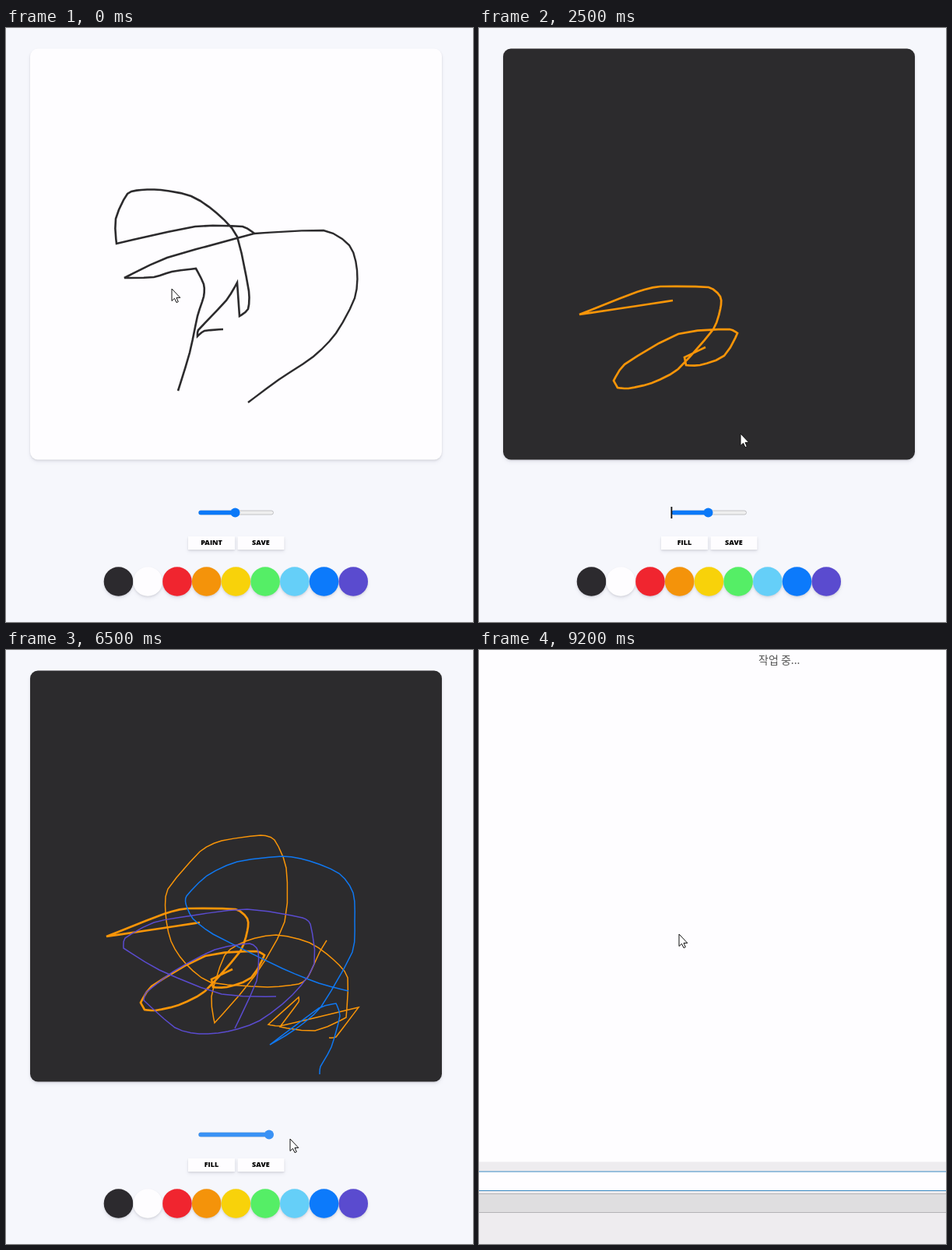
Write an HTML page that moves like this. It is 600x763 px and loops after 9400 ms.

```html
<!DOCTYPE html>
<html lang="en">
<head>
<meta charset="utf-8">
<title>Paint board</title>
<style>
  html, body { margin: 0; width: 100%; height: 100%; overflow: hidden; background: #f6f7fc; }
  svg { display: block; width: 600px; height: 763px; }
  .raised { filter: drop-shadow(0 1px 1px rgba(0,0,0,.1)) drop-shadow(0 3px 2px rgba(50,50,93,.08)); }
  .label { font: 800 9px "Open Sans", "Noto Sans", sans-serif; text-anchor: middle; }
  .status { font: 300 14px "Noto Sans CJK KR", "Noto Sans CJK", sans-serif; fill: #555; }
  .ink { fill: none; stroke-miterlimit: 4; }
</style>
</head>
<body>
<svg viewBox="0 0 600 763">
  <g id="app">
    <rect width="600" height="763" fill="#f6f7fc"/>
    <rect id="board" class="raised" x="31" y="26.5" width="529" height="528" rx="10"/>
    <g id="drawing"></g>
    <rect x="247.5" y="620" width="96" height="5" rx="2.5" fill="#efefef" stroke="#b5b5b8" stroke-width=".8"/>
    <g id="slider">
      <rect id="level" x="247.5" y="619.8" height="5.4" rx="2.5"/>
      <circle id="thumb" cy="622.5" r="6"/>
    </g>
    <rect id="caret" x="246.5" y="615" width="1.8" height="15" fill="#111"/>
    <g class="raised" fill="#fefdff">
      <rect x="234" y="653" width="60" height="17"/>
      <rect x="297.5" y="653" width="60" height="17"/>
    </g>
    <text id="mode" class="label" x="264" y="664.3"></text>
    <text class="label" x="327.3" y="664.3">SAVE</text>
    <g id="palette" class="raised"></g>
  </g>
  <g id="dialog">
    <rect width="600" height="763" fill="#fefdff"/>
    <text class="status" x="359" y="18">작업 중...</text>
    <rect y="657.5" width="600" height="106" fill="#eeecef"/>
    <rect x="-2" y="670" width="604" height="24.5" fill="#fefdff" stroke="#3a8ac2"/>
    <rect x="-2" y="698.5" width="604" height="24" fill="#dfdee0" stroke="#b3b2b5"/>
  </g>
  <path id="cursor" d="M0 0V15.5L3.5 12.3 6 17.6 8.3 16.6 6 11.4H10.8Z" fill="#fff" stroke="#111"/>
</svg>
<script>
const LOOP = 9400, STEP = 100;
const FILL_AT = 200, PAINT_AT = 1800, SHRINK_AT = 2700, GROW_AT = 6200, DIALOG_AT = 9100;
const DARK = '#2c2b2d', ORANGE = '#f99508', BLUE = '#0f78f2', PURPLE = '#5a4bcf';
const $ = id => document.getElementById(id);
const swatchX = i => 144.5 + 37.72 * i;
const ramp = (t, from, to) => Math.max(0, Math.min(1, (t - from) / (to - from)));
const show = (id, on) => $(id).setAttribute('display', on ? 'inline' : 'none');

function add(parent, tag, attrs) {
  const el = document.createElementNS('http://www.w3.org/2000/svg', tag);
  for (const key in attrs) el.setAttribute(key, attrs[key]);
  return parent.appendChild(el);
}

// Handle at key point i: along its neighbours' chord, or none at ends and sharp turns.
function handle(keys, i) {
  if (i === 0 || i === keys.length - 1) return [0, 0];
  const [[ax, ay], [bx, by], [cx, cy]] = keys.slice(i - 1, i + 2);
  const before = Math.hypot(bx - ax, by - ay), after = Math.hypot(cx - bx, cy - by);
  const turn = ((bx - ax) * (cx - bx) + (by - ay) * (cy - by)) / (before * after);
  if (turn < 0.6) return [0, 0];
  const size = 0.3 * Math.min(before, after) / Math.hypot(cx - ax, cy - ay);
  return [(cx - ax) * size, (cy - ay) * size];
}

// A coarse polyline along a curve through the key points, like sparse mouse samples.
function trace(text, pieces = 3) {
  const keys = text.trim().split(/\s+/).map(pair => pair.split(',').map(Number));
  const points = [keys[0]];
  for (let i = 1; i < keys.length; i++) {
    const a = keys[i - 1], b = keys[i], out = handle(keys, i - 1), into = handle(keys, i);
    for (let n = 1; n <= pieces; n++) {
      const u = n / pieces, v = 1 - u;
      points.push([0, 1].map(k => v ** 3 * a[k] + 3 * v * v * u * (a[k] + out[k])
        + 3 * v * u * u * (b[k] - into[k]) + u ** 3 * b[k]));
    }
  }
  return points;
}

function stroke(color, width, start, end, keys) {
  const el = add($('drawing'), 'polyline', { class: 'ink', stroke: color, 'stroke-width': width });
  return { el, start, end, points: trace(keys) };
}

const sketch = [
  stroke(DARK, 2.6, -2, -1, `221,466 236,417 246,370 254,345 254,329 244,309 213,313 190,320 152,321
    207,295 319,264 304,255 243,255 142,277 141,245 156,213 174,208 199,208 238,216 271,238 297,268
    312,338 311,361 300,370 297,327 283,350 247,388 246,396 255,389 279,387`),
  stroke(DARK, 2.4, -2, -1, '319,264 408,260 441,279 451,311 448,347 424,392 395,422 350,452 311,481')
];
const painted = [
  stroke(ORANGE, 2.7, 2000, 2400, `249,350 203,357 129,368 203,339 233,332 295,333 310,345 310,361
    301,387 256,438 222,456 192,463 178,462 173,453 187,432 256,393 322,387 332,392 315,421 284,433
    266,433 264,423 291,410`),
  stroke(ORANGE, 1.5, 3200, 3900, `412,373 403,388 388,420 376,429 336,433 263,427 231,403 212,374
    205,338 208,307 249,259 277,245 327,238 345,244 360,280 358,349 320,418 268,479 264,445 281,392
    308,374 347,366 390,376 421,398 439,421 437,472 397,489 352,484 376,452 376,446 337,481 352,483
    453,459 424,497 415,498`),
  stroke(BLUE, 1.5, 4300, 4700, `440,438 402,428 355,409 266,365 240,345 231,326 232,316 258,290
    297,272 355,265 390,271 428,287 446,312 448,348 445,388 405,458 372,487 339,507 402,460 424,454
    429,470 418,510 404,535 403,545`),
  stroke(PURPLE, 1.5, 5400, 6000, `347,445 277,442 197,411 151,383 153,370 190,350 240,341 310,333
    381,344 391,352 396,403 368,443 326,476 285,490 248,493 217,485 177,450 180,440 215,413 268,385
    313,377 324,387 322,425 294,486`),
  stroke(PURPLE, 5, 6800, 7200, `471,211 428,208 330,172 276,154 229,149 215,157 217,255 217,340
    232,382 262,419 283,420 312,411 324,400 323,385 284,335 300,343 370,342 440,312 488,287 455,295
    287,353 303,341 310,305 280,306 232,319 188,324 168,398 146,421 127,433 127,455`)
];

// Where the hand goes between strokes; the stroke ends join the route by themselves.
const route = [
  [0, 213, 335], [600, 121, 548], [1300, swatchX(3), 712], [PAINT_AT, 263, 662],
  [2500, 336, 521], [SHRINK_AT + 200, 265, 623], [4100, swatchX(7), 712], [4900, 439, 735],
  [5100, swatchX(8), 715], [GROW_AT, 265, 622], [6500, 365, 628], [7300, 134, 470],
  [8000, 327, 661], [8900, 257, 365], [LOOP, 257, 365],
  ...painted.flatMap(s => [[s.start, ...s.points[0]], [s.end, ...s.points.at(-1)]])
].sort((a, b) => a[0] - b[0]);

function handAt(t) {
  const active = painted.find(s => t >= s.start && t <= s.end);
  if (active) return drawn(active, t).at(-1);
  const i = route.findIndex(stop => stop[0] > t);
  const [from, x, y] = route[i - 1], [to, nextX, nextY] = route[i];
  const p = ramp(t, from, to);
  return [x + (nextX - x) * p, y + (nextY - y) * p];
}

function drawn({ start, end, points }, t) {
  return points.slice(0, 1 + Math.floor(ramp(t, start, end) * (points.length - 1)));
}

['#2c2a2e', '#fefdff', '#f0252f', '#f4930a', '#f8d20a', '#55ee66', '#65cff8', '#0c7afb', '#5a4bcf']
  .forEach((fill, i) => add($('palette'), 'circle', { cx: swatchX(i), cy: 711, r: 18.8, fill }));

function render(time) {
  const t = Math.floor((time % LOOP) / STEP) * STEP;
  const filled = t >= FILL_AT, saving = t >= DIALOG_AT;

  $('board').setAttribute('fill', filled ? DARK : '#fefdff');
  for (const s of sketch) s.el.setAttribute('points', filled ? '' : s.points.join(' '));
  for (const s of painted) s.el.setAttribute('points', t > s.start ? drawn(s, t).join(' ') : '');

  const knob = 294.5 - 29.5 * ramp(t, SHRINK_AT, SHRINK_AT + 200) + 73 * ramp(t, GROW_AT, GROW_AT + 200);
  const dragging = [SHRINK_AT, GROW_AT].some(at => t >= at && t <= at + 300);
  $('thumb').setAttribute('cx', knob);
  $('level').setAttribute('width', knob - 247.5);
  $('slider').setAttribute('fill', dragging ? '#3a92f5' : '#0b79f8');

  $('mode').textContent = t < PAINT_AT ? 'PAINT' : 'FILL';
  show('caret', (t + 900) % 1100 < 550);
  show('app', !saving);
  show('dialog', saving);
  $('cursor').setAttribute('transform', `translate(${handAt(t)})`);
}

const began = performance.now();
function tick() {
  render(performance.now() - began);
  requestAnimationFrame(tick);
}
render(0);
requestAnimationFrame(tick);
</script>
</body>
</html>
```
